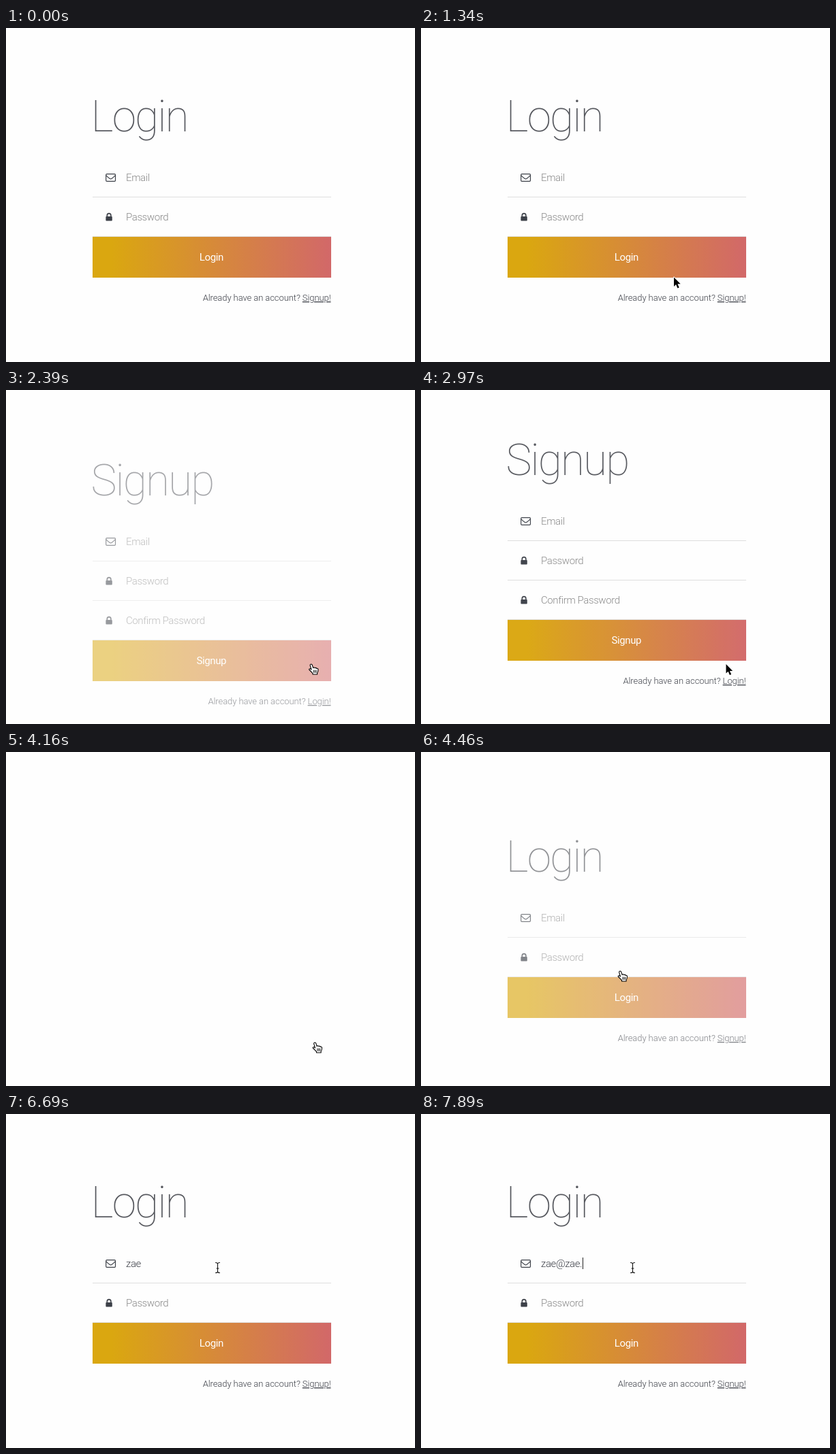
Recreate the animation shown at these times as an HTML page. Size 600 px wide and 491 px high, loop 8 s.

```html
<!DOCTYPE html>
<html lang="en">
<head>
<meta charset="utf-8">
<title>Login and signup form</title>
<style>
  html, body { margin: 0; width: 100%; height: 100%; overflow: hidden; background: #fefefe; }
  svg { display: block; }
  text { font: 300 15px Roboto, Inter, sans-serif; letter-spacing: -.4px; fill: #3c3f47; white-space: pre; }
  .title { font-size: 64px; font-weight: 100; letter-spacing: -1.9px; fill: #55575d; }
  .hint { fill: #888; }
  .label { font-weight: 400; fill: #fff; text-anchor: middle; }
  .note { font-size: 13px; letter-spacing: -.08px; text-anchor: end; }
  .link { text-decoration: underline; }
</style>
</head>
<body>
<svg width="600" height="491" viewBox="0 0 600 491">
  <defs>
    <linearGradient id="warm">
      <stop offset=".08" stop-color="#daa710"/>
      <stop offset="1" stop-color="#d26869"/>
    </linearGradient>
    <g id="mail" fill="none" stroke="#3c4048" stroke-width="1.2">
      <rect x="146.7" y="-5.4" width="13.8" height="10.8" rx="1.3"/>
      <path d="M147-3.2Q149-1 152 1.2Q153.6 2.5 155.2 1.2Q158.2-1 160.2-3.2"/>
    </g>
    <g id="lock">
      <path d="M148.3 0V-2.6A2.8 2.8 0 0 1 153.9-2.6V0" fill="none" stroke="#3c4048" stroke-width="1.6"/>
      <rect x="146.4" y="-1" width="9.4" height="6.4" rx=".9" fill="#3c4048"/>
    </g>
  </defs>
  <g id="login"></g>
  <g id="signup"></g>
  <rect id="caret" y="211" width="1" height="17" fill="#222"/>
  <g id="cursor" stroke-linejoin="round" stroke-linecap="round">
    <path id="arrow" d="M0 0V13.6L3.1 10.7 5.4 16 7.7 15 5.4 9.9H9.7Z" stroke="#fff" stroke-width="1.6" paint-order="stroke"/>
    <g id="hand" transform="translate(-3.5 -1)" fill="#fff" stroke="#000" stroke-width="1.1">
      <path d="M3 1.2C4.5.6 5.3 2 5.6 3.3L6.6 6.6C7 5.4 9 5.6 9.2 6.8C10 5.9 11.4 6.3 11.6 7.4C12.6 6.9 14 7.5 14 8.8C14 11 13.4 13 12.6 14V16H6V14.6C4.6 13 2.8 11 1 9.5C0 8.3 1.6 7.2 3 8L4 9 2.2 3.2C1.9 2.2 2.2 1.5 3 1.2Z"/>
      <path d="M7.4 10V13.4M9.3 10V13.4M11.2 10V13.4" stroke-width=".9"/>
    </g>
    <path id="beam" d="M-3-7.5Q0-7.5 0-5.5Q0-7.5 3-7.5M0-5.5V5.5M-3 7.5Q0 7.5 0 5.5Q0 7.5 3 7.5M-1.5 1H1.5" fill="none" stroke="#111" stroke-width="1.1"/>
  </g>
</svg>
<script>
const LOOP = 8000, STEP = 147, SLIDE = 68, FADE = 900;
const TYPED = 'zae@zae.';
const $ = id => document.getElementById(id);

function buildForm(id, name, other, fields, top) {
  const end = top + 58 * fields.length;
  const rows = fields.map((field, i) => {
    const y = top + 58 * i;
    return `<use href="#${i ? 'lock' : 'mail'}" y="${y}"/>
      <text class="hint" x="176" y="${y + 5}">${field}</text>
      <rect x="127" y="${y + 28}" width="350" height="1" fill="#dedede"/>`;
  });
  $(id).innerHTML = `<text class="title" x="124.5" y="${top - 68}">${name}</text>${rows.join('')}
    <rect x="127" y="${end - 29}" width="350" height="60" fill="url(#warm)"/>
    <text class="label" x="301.3" y="${end + 6}">${name}</text>
    <text class="note" x="476.5" y="${end + 65}">Already have an account? <tspan class="link">${other}!</tspan></text>`;
}
buildForm('login', 'Login', 'Signup', ['Email', 'Password'], 220);
buildForm('signup', 'Signup', 'Login', ['Email', 'Password', 'Confirm Password'], 191);
const email = $('login').querySelector('.hint');

// [start time, steps, from x, y, to x, y]
const moves = [
  [1040, 5, 320, 342, 447.5, 403],
  [2970, 5, 447.5, 403, 453, 427],
  [4160, 2, 453, 427, 292, 322],
  [4454, 3, 292, 322, 310.5, 226]
];
const shapes = [[0, ''], [1040, 'hand'], [1340, 'arrow'], [1640, 'hand'], [2825, 'arrow'], [3555, 'hand'], [4590, 'beam']];
const keys = [[0, 0], [5790, 1], [5940, 2], [6090, 3], [6990, 4], [7290, 6], [7440, 7], [7890, 8]];

const latest = (list, t) => list.findLast(item => item[0] <= t);
const stepsSince = (t, start) => Math.floor((t - start) / STEP);

// The CSS "ease" curve, solved by bisection.
function ease(x) {
  if (x <= 0) return 0;
  if (x >= 1) return 1;
  let lo = 0, hi = 1, s;
  for (let i = 0; i < 24; i++) {
    s = (lo + hi) / 2;
    if (.75 * s - .75 * s * s + s ** 3 < x) lo = s; else hi = s;
  }
  return .3 * s + 2.4 * s * s - 1.7 * s ** 3;
}

// A new form stays hidden for one step, then eases in.
function entrance(t, start, lead) {
  const steps = stepsSince(t, start);
  return steps > 0 ? ease((steps * STEP + lead) / FADE) : 0;
}

function showForm(id, visible, progress) {
  $(id).setAttribute('opacity', visible ? progress : 0);
  $(id).setAttribute('transform', `translate(0 ${Math.round(SLIDE * (1 - progress))})`);
}

function drawCursor(t) {
  const shape = latest(shapes, t)[1];
  for (const id of ['arrow', 'hand', 'beam']) $(id).style.display = id === shape ? '' : 'none';
  const move = latest(moves, t);
  if (!move) return;
  const [start, steps, x0, y0, x1, y1] = move;
  const p = Math.min(1, stepsSince(t, start) / steps);
  $('cursor').setAttribute('transform', `translate(${x0 + (x1 - x0) * p} ${y0 + (y1 - y0) * p})`);
}

function drawInput(t) {
  const text = TYPED.slice(0, latest(keys, t)[1]);
  email.textContent = text || 'Email';
  email.setAttribute('class', text ? '' : 'hint');
  const width = text ? email.getComputedTextLength() : 0;
  $('caret').setAttribute('x', Math.round(177 + width));
  $('caret').style.display = t >= 5190 && !(t >= 6690 && t < 6990) ? '' : 'none';
}

function draw(t) {
  const signup = t >= 2090 && t < 4160;
  showForm('signup', signup, entrance(t, 2090, -17));
  showForm('login', !signup, t < 2090 ? 1 : entrance(t, 4160, 44));
  drawCursor(t);
  drawInput(t);
}

function tick() {
  draw(performance.now() % LOOP);
  requestAnimationFrame(tick);
}
tick();
</script>
</body>
</html>
```
